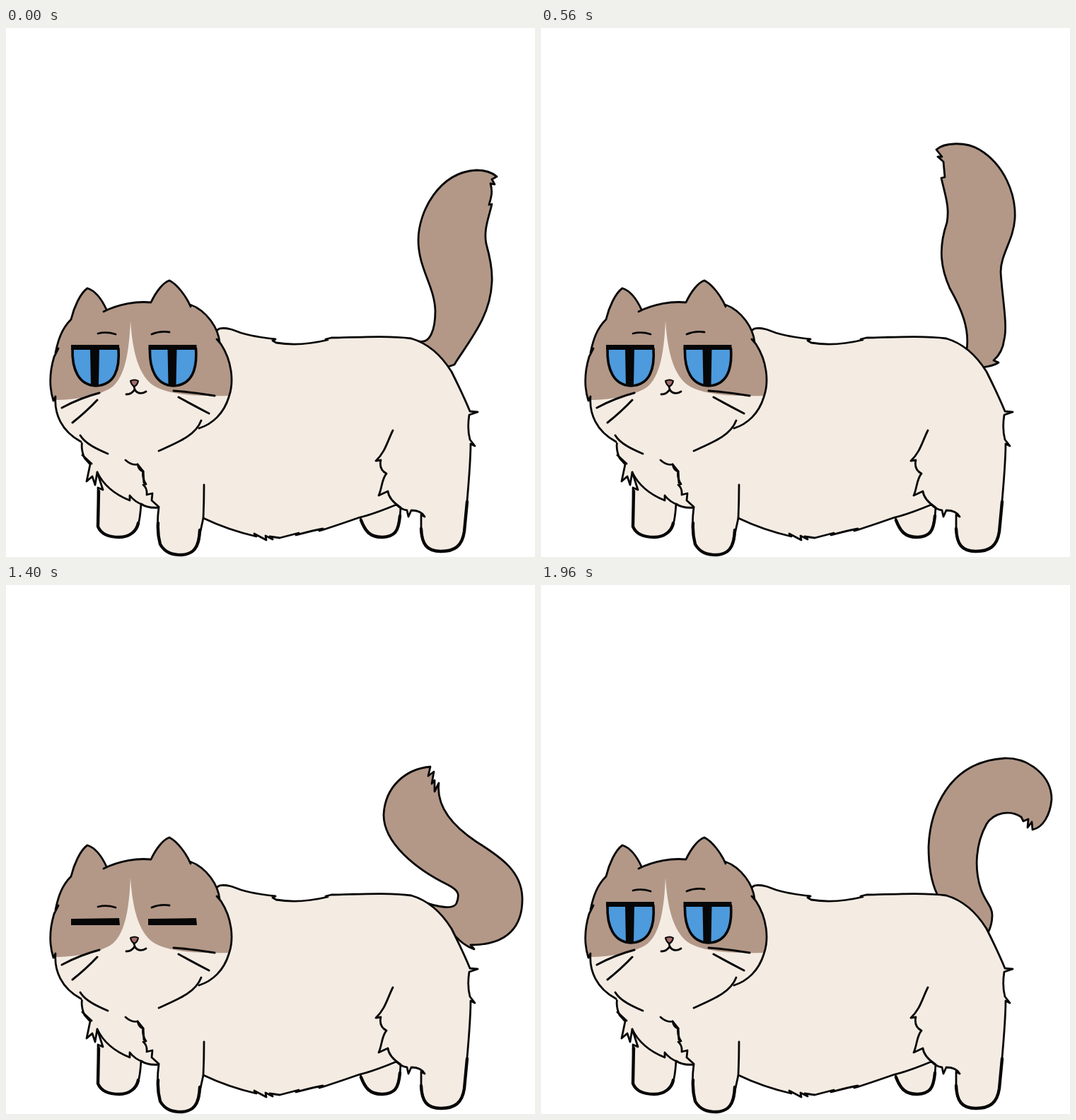
Recreate the animation shown at these times as an HTML page. Size 748 by 748 pixels, loop 2.1 s.

```html
<!DOCTYPE html>
<html lang="en">
<head>
<meta charset="utf-8">
<title>Cat swaying its tail</title>
<style>
  html, body { margin: 0; width: 100%; height: 100%; overflow: hidden; background: #fff; }
  svg { display: block; width: 100%; height: 100%; }
  path { stroke: #070707; stroke-width: 2.8; stroke-linecap: round; stroke-linejoin: round; fill: none; }
  .cream { fill: #f4ece3; }
  .brown, #tails path { fill: #b39888; }
  .plain { stroke: none; }
  .paw { stroke-width: 4.4; }
  .whisker { stroke-width: 3; }
  .eye { fill: #4d9add; stroke-width: 3.6; }
  .nose { fill: #a56c6c; stroke-width: 2; }
  .ink { fill: #070707; stroke: none; }
</style>
</head>
<body>
<svg viewBox="0 0 748 748">
  <g id="tails">
    <path d="M585 443C599 446 607 428 607 400C606 365 583 340 583 300C583 260 612 204 665 201C678 201 688 205 694 210L687 214L691 221L685 220C689 233 685 242 683 250L687 249C683 267 675 285 679 305C686 330 688 345 687 360C685 405 660 436 637 471L634 476L625 479"/>
    <path d="M580 442C610 455 640 442 640 418C640 390 575 360 567 305C562 260 603 224 654 226L645 237L652 239L645 248L648 268C642 300 655 320 685 345C715 365 734 390 733 420C730 460 690 488 640 486L643 491L628 484"/>
    <path d="M575 441C600 454 632 461 637 450C642 437 640 432 625 424C580 402 534 365 534 325C536 285 565 260 600 257L597 270L605 264L602 281L606 276L606 292L612 280C609 305 620 333 665 363C702 386 729 406 730 442C731 482 710 509 657 509L662 515C650 511 640 503 630 490"/>
    <path d="M585 443C625 465 646 450 640 430C630 405 570 385 553 330C545 302 525 286 503 282L506 272L493 266L500 260L491 254C505 230 535 222 560 226C605 235 615 280 630 310C650 345 715 370 718 430C718 475 690 505 653 501L658 506L630 490"/>
    <path d="M602 455C606 425 595 398 578 368C566 341 561 313 574 275C578 252 571 235 566 212L571 211L569 189L561 182L567 182L559 172C570 162 600 160 620 172C655 193 672 235 670 270C668 300 650 320 650 345C652 380 660 420 655 440C653 456 647 464 640 470L647 473C640 478 632 478 625 480"/>
    <path d="M590 446C592 425 575 395 562 370C548 335 556 295 578 275C590 260 600 250 598 238L603 238L599 224L608 226L607 214C651 205 686 247 681 285C676 310 645 340 642 370C642 400 658 420 652 450C648 470 639 482 632 490"/>
    <path d="M575 440C575 410 560 390 560 355C562 310 590 248 665 246C700 246 730 262 738 287L727 286L730 296L718 291L718 301C690 299 655 312 645 345C635 380 665 410 656 440C650 465 640 480 632 490"/>
    <path d="M560 437C552 420 548 395 548 370C550 320 575 250 655 245C690 244 722 270 722 303C720 325 710 343 695 346L694 335L688 343L689 331L682 334L679 328C663 317 640 322 630 338C615 365 612 400 622 430C628 448 638 454 638 467C638 479 635 486 632 492"/>
  </g>

  <!-- body -->
  <path class="cream" d="M500 690C508 712 515 720 532 720C550 719 557 712 558 676"/>
  <path class="cream" d="M302 425C312 423 322 427 332 431C348 436 364 438 381 440L377 442L382 445C405 449 430 447 455 441L452 440L460 438C500 437 545 435 573 439C597 446 615 462 630 486C640 506 649 525 656 542L667 543L655 547C653 560 653 571 656 582L663 591L657 588C657 620 652 670 648 712C645 732 635 740 615 740C595 740 588 730 587 712L587 688L592 691C588 684 580 682 573 682L569 691L567 682C561 681 556 678 552 674C535 681 518 688 500 692C480 699 460 706 443 711L448 708C436 710 425 713 410 717L414 714L387 721L373 719L377 723L367 718L368 724L351 715L354 719C328 713 302 704 279 693L274 716C273 735 265 744 248 745C235 745 225 742 218 730C214 715 213 700 216 678C205 679 197 677 191 673C190 685 190 691 187 702C185 711 175 720 160 720C149 720 135 717 130 705C130 690 131 680 130 650L137 653L129 628L126 646L122 634L114 641L119 617L111 608C107 599 106 592 108 583L180 500Z"/>
  <path class="paw" d="M131 655L130 705C135 717 149 720 160 720C175 720 185 711 187 700M215 700Q214 715 218 730C225 742 235 745 248 745C265 744 273 735 274 710M502 696C508 712 515 720 532 720C550 719 555 712 557 690M587 708C588 730 595 740 615 740C635 740 645 732 648 712L652 670"/>
  <path d="M279 693Q280 668 280 646M547 569C539 585 536 600 523 612L530 611C528 620 530 626 538 630C531 638 532 650 527 661L540 655C541 665 549 672 558 678M129 628C138 647 155 660 175 668V661Q182 670 193 674M169 611Q178 619 186 617Q188 626 194 627Q192 636 198 645L194 646Q200 651 199 660L207 658L206 668L216 677M108 604L121 616"/>
  <path class="whisker" d="M186 617L194 627L195 643"/>

  <!-- head -->
  <path class="cream plain" d="M92 412L115 369L142 398Q175 386 205 388L231 358L261 394C285 400 300 425 303 446C318 470 322 500 315 522C308 545 292 560 275 564C268 577 245 585 216 598L144 602L105 585C78 570 68 545 70 522C60 505 62 485 69 462C72 442 78 425 92 412Z"/>
  <path class="brown plain" d="M92 412C96 395 105 375 115 368C128 372 136 385 142 398Q175 386 205 388C212 373 222 360 231 357C243 363 255 380 261 394C285 400 300 425 303 446C316 466 322 495 316 520C270 521 225 519 205 503C188 488 179 460 176 414C174 460 168 492 151 507C132 521 95 526 68 526C61 505 62 485 69 462C72 442 78 425 92 412Z"/>
  <path d="M92 412C96 395 105 375 115 368C128 372 136 385 142 398M138 401C160 390 185 386 205 388C212 373 222 360 231 357C243 363 255 380 261 394M260 391C285 400 300 425 302 444M298 440L304 447C319 470 323 500 315 522C308 545 292 560 273 566M276 555C268 576 245 585 216 598M92 412C79 425 74 440 70 459M74 453L68 465C62 485 60 505 67 527L70 521C68 545 78 570 106 585M105 576C112 588 130 596 144 602"/>
  <path class="whisker" d="M132 516Q105 523 79 537M129 526Q113 543 94 558M237 513Q266 515 295 520M244 522Q266 534 287 545"/>
  <path class="nose" d="M176 499Q182 496 187 499Q186 505 181 507Q177 504 176 499Z"/>
  <path d="M181 507L182 511C179 516 175 518 170 518M182 511C185 517 192 518 198 514"/>

  <path id="brows" d="M130 432Q142 429 155 433M206 433Q218 428 231 430"/>
  <g id="eyes">
    <g>
      <g id="open">
        <path class="eye" d="M94 453H159C161 482 154 505 127 506C103 505 93 483 94 453Z"/>
        <path class="ink" d="M92 448H160V455H92ZM119 453H132L131 505H120Z"/>
      </g>
      <use href="#open" x="109.5"/>
    </g>
    <g>
      <g id="half">
        <path class="eye" d="M94 462H159Q160 478 156 493H97Q93 478 94 462Z"/>
        <path class="ink" d="M92 460H160V464H92ZM119 462H132V494H119Z"/>
      </g>
      <use href="#half" x="109.5"/>
    </g>
    <g>
      <path id="shut" class="ink" d="M92 472L160 471L161 481L92 481Z"/>
      <use href="#shut" x="109"/>
    </g>
  </g>
</svg>
<script>
  const STEP = 140;
  const tailOrder = [0, 1, 2, 3, 4, 5, 6, 7, 0, 1, 2, 3, 4, 6, 7];
  const blink = { 8: 1, 9: 2, 10: 2, 11: 1 };
  const browDrop = [0, 12, 23];
  const tails = document.getElementById('tails').children;
  const eyes = document.getElementById('eyes').children;
  const brows = document.getElementById('brows');

  function showOnly(items, index) {
    [...items].forEach((item, i) => { item.style.display = i === index ? '' : 'none'; });
  }

  function draw() {
    const step = Math.floor(performance.now() / STEP) % tailOrder.length;
    const lid = blink[step] || 0;
    showOnly(tails, tailOrder[step]);
    showOnly(eyes, lid);
    brows.setAttribute('transform', `translate(0 ${browDrop[lid]})`);
    requestAnimationFrame(draw);
  }
  draw();
</script>
</body>
</html>
```
